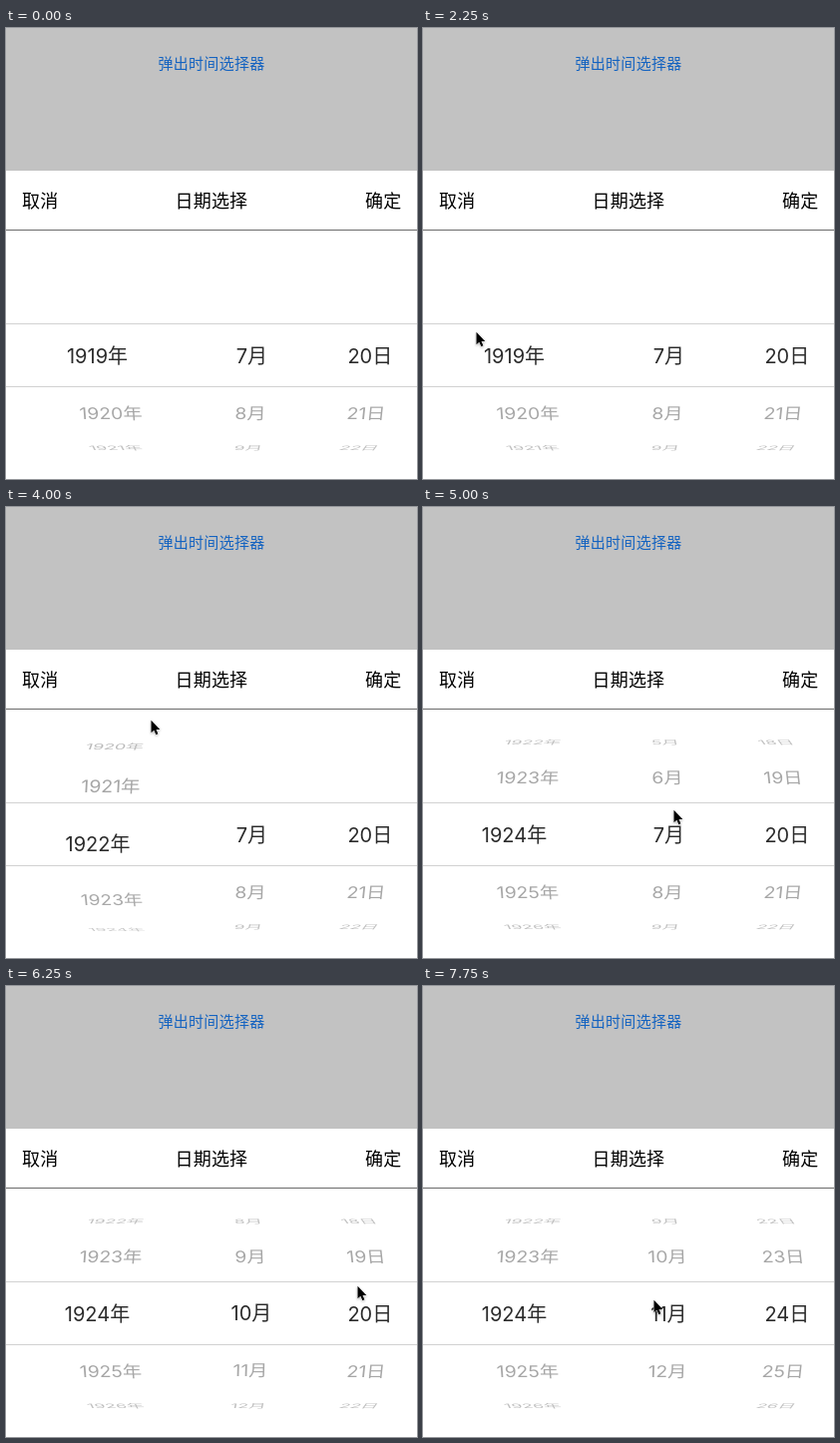
These frames come from a looping animation (412 by 452 pixels, 8000 ms). An HTML page:

```html
<!DOCTYPE html>
<html lang="zh-CN">
<head>
<meta charset="utf-8">
<title>日期选择</title>
<style>
html, body { margin: 0; width: 100%; height: 100%; overflow: hidden; background: #fff; }
body { font-family: Inter, "Noto Sans CJK SC", "Noto Sans CJK", sans-serif; color: #000; }
#stage { position: relative; width: 412px; height: 452px; overflow: hidden; background: #fff; }
#stage div, #stage span, svg { position: absolute; }
#shade { left: 0; top: 0; width: 412px; height: 143px; background: #c2c2c2; }
#open { left: 0; width: 412px; top: 26px; line-height: 20px; text-align: center;
  font-size: 15px; letter-spacing: .28px; color: #1463c0; }
.head { top: 162px; line-height: 24px; font-size: 18px; letter-spacing: .2px; white-space: nowrap; }
.rule { left: 0; width: 412px; height: 1px; }
#outer { left: 0; top: 203px; width: 412px; height: 223px; overflow: hidden; color: #a4a4a4; }
#band { left: 0; top: 297px; width: 412px; height: 62px; overflow: hidden; background: #fff; color: #2b2b2b; }
.item { font-size: 20px; line-height: 26px; white-space: nowrap; }
#cursor { left: 0; top: 0; overflow: visible; filter: drop-shadow(0 1px 1px rgba(0,0,0,.3)); }
</style>
</head>
<body>
<div id="stage">
  <div id="shade"></div>
  <div id="open">弹出时间选择器</div>
  <div class="head" style="left:16px">取消</div>
  <div class="head" style="left:169.5px">日期选择</div>
  <div class="head" style="left:360px">确定</div>
  <div class="rule" style="top:202px;background:#6c6c6c"></div>
  <div id="outer"></div>
  <div id="band"></div>
  <div class="rule" style="top:296px;background:#d2d2d2"></div>
  <div class="rule" style="top:359px;background:#d2d2d2"></div>
  <svg id="cursor" width="14" height="20">
    <path d="M.5 .8V13.3L3.4 10.7L5.4 15.2L7.4 14.3L5.5 10H9.3Z" stroke="#fff" stroke-width=".8" paint-order="stroke"/>
  </svg>
</div>
<script>
const LOOP = 8000, STEP = 250;
const MID = 328.7, RADIUS = 97, PITCH = 36.2, DEPTH = 480;
const SHOW = 3, UNLOCK = 20;   // steps: pointer appears, lower limits open up

const smooth = k => k * k * (3 - 2 * k);
const glide = k => 1 - (1 - k) ** 1.335;

// x: selected row, far: other rows, bend: sideways curve, lean: slant
const wheels = [
  { unit: "年", x: 91.5, far: 103.7, bend: 10, lean: .5, first: 1919, low: 1919, high: 2100,
    last: 1924, from: 11.2, to: 20, ease: smooth },
  { unit: "月", x: 246.4, far: 246, bend: -5, lean: -.2, first: 7, low: 1, high: 12,
    last: 11, from: 20, to: 27.7, ease: glide },
  { unit: "日", x: 364.8, far: 363.2, bend: -15, lean: -.7, first: 20, low: 1, high: 31,
    last: 24, from: 26.2, to: 31, ease: smooth }
];

// Pointer stops: step, x, y
const stops = [
  [3, 343, 42], [6, 341, 42], [9, 53, 304], [11, 95, 329], [16, 145, 213],
  [20, 251, 303], [22, 262, 247], [25, 352, 300], [28, 362, 230], [31, 231, 314]
];

const el = id => document.getElementById(id);
const mix = (a, b, k) => a + (b - a) * k;
const span = (n, from, to) => Math.min(1, Math.max(0, (n - from) / (to - from)));

function pointerAt(n) {
  const i = Math.max(1, stops.findIndex(s => n <= s[0]));
  const [t0, x0, y0] = stops[i - 1], [t1, x1, y1] = stops[i];
  const k = smooth(span(n, t0, t1));
  return [mix(x0, x1, k), mix(y0, y1, k)];
}

function item(text, x, y, transform, alpha) {
  return `<span class="item" style="left:${x}px;top:${y}px;opacity:${alpha};` +
    `transform:translate(-50%,-50%) ${transform}">${text}</span>`;
}

function draw(n) {
  let outer = "", band = "";
  for (const w of wheels) {
    const pos = mix(w.first, w.last, w.ease(span(n, w.from, w.to)));
    const low = n < UNLOCK ? w.first : w.low;
    const begin = Math.max(low, Math.floor(pos) - 3), end = Math.min(w.high, Math.ceil(pos) + 3);
    for (let v = begin; v <= end; v++) {
      const deg = (v - pos) * PITCH, turn = Math.abs(deg) / 90;
      if (turn > 1.1) continue;
      const rad = deg * Math.PI / 180, cos = Math.cos(rad);
      const y = MID + RADIUS * Math.sin(rad);
      const tall = Math.max(.12, cos);
      const wide = 1 / (1 + RADIUS * (1 - cos) / DEPTH);
      const skew = Math.atan(w.lean * Math.sign(deg) * .5 * turn ** 1.5);
      const alpha = 1 - .6 * Math.min(1, turn ** 3);
      const text = v + w.unit;
      outer += item(text, w.far + w.bend * turn ** 2.2, y - 203, `scale(${wide},${tall}) skewX(${skew}rad)`, alpha);
      band += item(text, w.x, y - 297, `scale(1,${tall})`, turn < .33 ? 1 : 0);
    }
  }
  el("outer").innerHTML = outer;
  el("band").innerHTML = band;
  const [x, y] = pointerAt(n), cursor = el("cursor");
  cursor.style.visibility = n < SHOW ? "hidden" : "visible";
  cursor.style.transform = `translate(${x}px,${y}px)`;
}

const start = performance.now();
let shown = -1;
function tick() {
  const n = Math.floor((performance.now() - start) % LOOP / STEP);
  if (n !== shown) draw(shown = n);
  requestAnimationFrame(tick);
}
tick();
</script>
</body>
</html>
```
